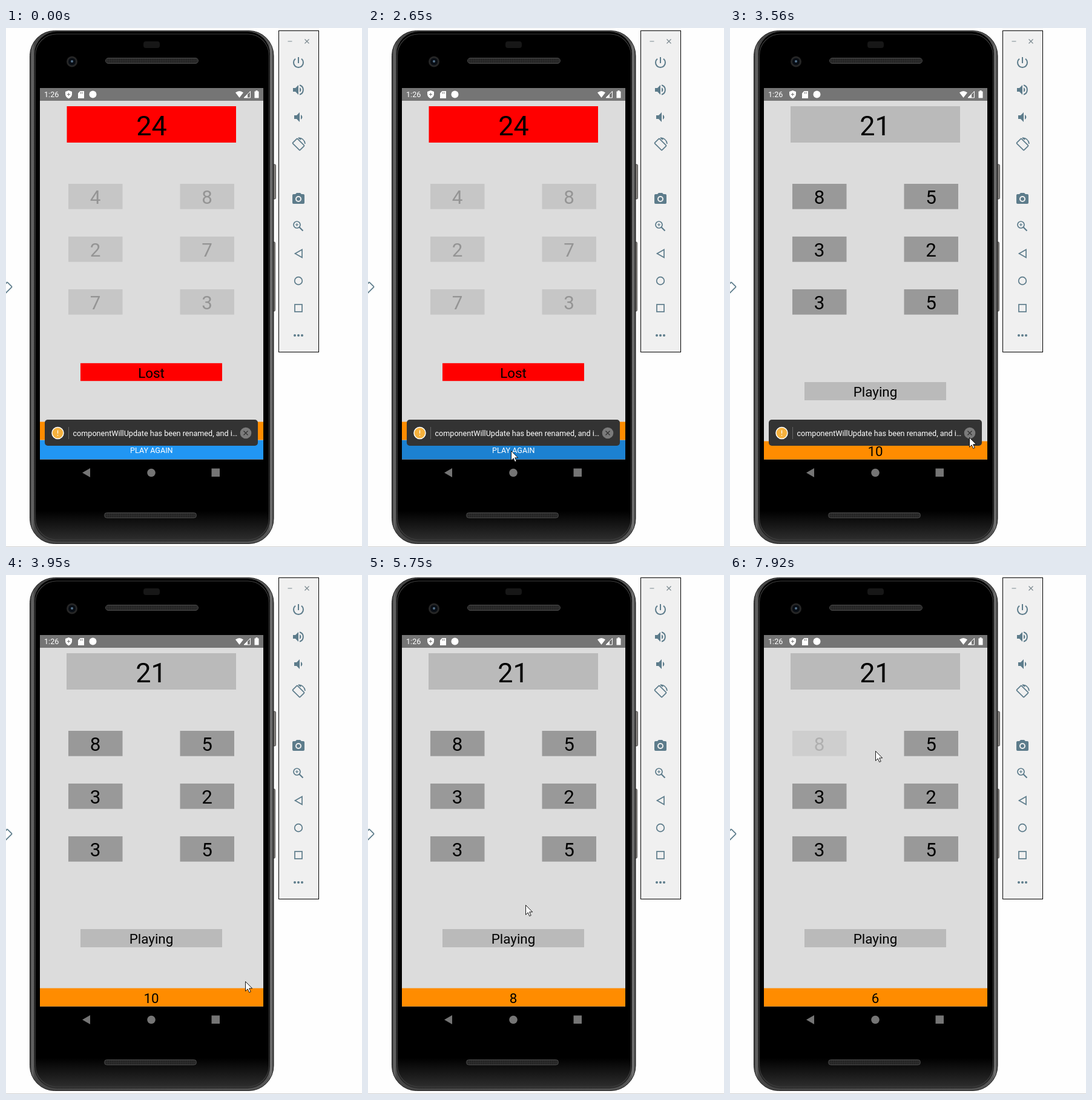
Recreate the animation shown at these times as an HTML page. Size 588x856 px, loop 7.99 s.

```html
<!DOCTYPE html>
<html lang="en">
<head>
<meta charset="utf-8">
<title>Number game on a phone emulator</title>
<style>
  html, body { margin: 0; width: 100%; height: 100%; overflow: hidden; background: #fefefe; }
  svg { display: block; width: 588px; height: 856px; }
  text { font-family: Roboto, sans-serif; }
  .mid { text-anchor: middle; }
  .big { font-size: 44.9px; }
  .digit { font-size: 31.4px; }
  .label { font-size: 22.4px; }
  .small { font-size: 12.6px; fill: #fff; }
  #tools { fill: none; stroke: #5d7c8b; stroke-width: 1.7; }
  #tools .solid { fill: #5d7c8b; stroke: none; }
</style>
</head>
<body>
<svg viewBox="0 0 588 856">
  <defs>
    <linearGradient id="rim">
      <stop offset="0" stop-color="#333"/><stop offset=".01" stop-color="#666"/>
      <stop offset=".02" stop-color="#444"/><stop offset=".98" stop-color="#555"/>
      <stop offset=".99" stop-color="#777"/><stop offset="1" stop-color="#333"/>
    </linearGradient>
    <linearGradient id="glass" x2="0" y2="1">
      <stop offset=".94"/><stop offset="1" stop-color="#303030"/>
    </linearGradient>
    <pattern id="mesh" width="3" height="3" patternUnits="userSpaceOnUse">
      <rect width="3" height="3" fill="#303030"/><circle cx="1.5" cy="1.5" r=".9" fill="#161616"/>
    </pattern>
    <clipPath id="playClip"><rect x="56" y="679.5" width="369" height="32"/></clipPath>
  </defs>
  <path d="M0 855.5H588" stroke="#d0d0d0"/>

  <g id="phone">
    <g fill="#8a8683" stroke="#333" stroke-width=".8">
      <rect x="438" y="225" width="7.5" height="57" rx="1.5"/>
      <rect x="438" y="353" width="6.5" height="114" rx="1.5"/>
    </g>
    <rect x="39.5" y="4.500" width="402.500" height="846" rx="41" fill="url(#rim)" stroke="#1c1c1c"/>
    <rect x="47" y="6" width="389" height="841" rx="37" fill="url(#glass)"/>
    <rect x="48.5" y="10" width="386" height="834" rx="35" fill="none" stroke="#3c3c3c" stroke-width="1.2"/>
    <rect x="227" y="22" width="27" height="11" rx="4" fill="#171717"/>
    <g fill="url(#mesh)" stroke="#464646">
      <rect x="164.5" y="49.500" width="153" height="9" rx="4.500"/>
      <rect x="162.5" y="799.500" width="152" height="8.500" rx="4"/>
    </g>
    <circle cx="109" cy="55.500" r="9" fill="#262626"/>
    <circle cx="109" cy="55.500" r="6" fill="#080d14"/>
    <circle cx="109" cy="55" r="2" fill="#55718a"/>
  </g>

  <rect x="56" y="99" width="369" height="612.5" fill="#dcdcdc"/>
  <g id="status" fill="#fff">
    <rect x="56" y="99" width="369" height="21" fill="#757575"/>
    <text x="63" y="114" class="small">1:26</text>
    <path d="M103.5 103l5.500 2v4q0 5-5.500 7.500-5.500-2.500-5.500-7.500v-4z"/>
    <path d="M122.5 104h6.500v12h-10v-8.500z"/>
    <path d="M103.5 107v5M101 109.500h5M123.500 105.500v3M126 105.500v3" stroke="#757575"/>
    <circle cx="143.500" cy="109.500" r="6"/>
    <path d="M379 106.500q6.500-5 13 0l-6.500 8.500z"/>
    <path d="M403.500 104.500v10.500h-10.500z" fill="none" stroke="#fff"/>
    <path d="M399 109v6h-6z"/>
    <path d="M412.500 103h3v1.500h2v11h-7v-11h2z"/>
  </g>

  <g id="lost">
    <rect x="100.500" y="129" width="279.500" height="60" fill="red"/>
    <text x="240.500" y="177" class="mid big">24</text>
    <g id="lostTiles"></g>
    <rect x="123" y="552.800" width="234" height="29.400" fill="red"/>
    <text x="240" y="576.500" class="mid label">Lost</text>
    <rect x="56" y="649.500" width="369" height="30" fill="#ff8c00"/>
    <g clip-path="url(#playClip)">
      <rect x="56" y="679.500" width="369" height="32" fill="#2196f3"/>
      <circle id="ripple" cx="208" cy="697" opacity=".14"/>
    </g>
    <text x="240.300" y="700.500" class="mid small">PLAY AGAIN</text>
  </g>

  <g id="playing">
    <rect x="100" y="129" width="280" height="60" fill="#bababa"/>
    <text x="239.500" y="177" class="mid big">21</text>
    <g id="playTiles"></g>
    <rect x="123" y="584" width="234" height="30" fill="#bababa"/>
    <text x="240" y="608" class="mid label">Playing</text>
    <rect x="56" y="681.500" width="369" height="30" fill="#ff8c00"/>
    <text id="timer" x="240" y="705.500" class="mid label"></text>
  </g>

  <g id="banner">
    <rect x="64" y="646" width="352" height="43" rx="5" fill="#333"/>
    <circle cx="85.500" cy="668" r="9.500" fill="#f5b13d" stroke="#fff" stroke-width="1.500"/>
    <path d="M85.500 663.500v5.500M85.500 671v1.500" stroke="#fff" stroke-width="1.200"/>
    <path d="M103.500 658v20" stroke="#666"/>
    <text x="110.500" y="672.700" class="small">componentWillUpdate has been renamed, and i…</text>
    <circle cx="396" cy="668" r="9.300" fill="#7b7b7b"/>
    <path d="M392.500 664.500l7 7m0-7l-7 7" stroke="#333" stroke-width="1.400"/>
  </g>

  <g id="nav" fill="#757575">
    <path d="M139 726v15l-13-7.500z"/>
    <circle cx="240" cy="733.500" r="6.800"/>
    <rect x="339.500" y="726.500" width="13.500" height="13.500"/>
  </g>

  <rect x="450.500" y="4.500" width="66" height="530" fill="#f0f0f0" stroke="#000"/>
  <path d="M465.500 22h7M493.500 18.500l7 7m0-7l-7 7" stroke="#7b8990" stroke-width="1.200"/>
  <g id="tools">
    <g stroke-width="2"><path d="M0-9V1M-5-6.200A8 8 0 1 0 5-6.200"/></g>
    <g stroke-width="2">
      <path id="speaker" class="solid" d="M-9-3h4l5-5V8l-5-5h-4z"/>
      <path d="M2-7.700a8 8 0 0 1 0 15.400"/>
      <path id="wave" class="solid" d="M2-4a4.500 4.500 0 0 1 0 8z"/>
    </g>
    <g><use href="#speaker" x="2"/><use href="#wave" x="2"/></g>
    <g id="rotate">
      <rect x="-8.500" y="-5.500" width="17" height="11" rx="1" transform="rotate(45)"/>
      <path d="M0-11Q10-10 11-1M4-8L0-11"/>
    </g>
    <g><use href="#rotate" transform="scale(-1 1)"/></g>
    <g>
      <path class="solid" d="M-3-10H3l2 2h3q2 0 2 2V6q0 2-2 2H-8q-2 0-2-2V-6q0-2 2-2h3z"/>
      <circle r="4" stroke="#f0f0f0" stroke-width="2"/>
    </g>
    <g>
      <circle cx="-2.500" cy="-2.500" r="5.500"/>
      <path d="M1.500 1.500l6 6" stroke-width="2.200"/>
      <path d="M-5-2.500h5M-2.500-5v5" stroke-width="1.200"/>
    </g>
    <g><path d="M6-6.500v13L-5.500 0z"/></g>
    <g><circle r="6.300"/></g>
    <g><rect x="-6" y="-6" width="12" height="12"/></g>
    <g class="solid"><circle cx="-6" r="2"/><circle r="2"/><circle cx="6" r="2"/></g>
  </g>

  <g id="cursor">
    <circle id="click" r="15" fill="#ff0" opacity=".47"/>
    <path d="M.5.500V16.300L4.200 12.800 6.700 18.500 9.200 17.400 6.700 11.800H11.700z" fill="#fff" stroke="#000" stroke-width=".9"/>
  </g>
</svg>
<script>
const LOOP = 7990, STEP = 77, NEW_GAME = 3560, BANNER_GONE = 3950;
const $ = id => document.getElementById(id);
const show = (id, on) => $(id).setAttribute('display', on ? 'inline' : 'none');
const within = (t, a, b) => t >= a && t < b;
const progress = (t, a, b) => Math.min(1, Math.max(0, (t - a) / (b - a)));

[...$('tools').children].forEach((icon, i) =>
  icon.setAttribute('transform', `translate(483 ${57 + 45 * i})`));

const tiles = (digits, opacity) => [...digits].map((d, i) => {
  const x = i % 2 ? 287.5 : 103, y = 257 + 87 * (i >> 1);
  return `<g opacity="${opacity}"><rect x="${x}" y="${y}" width="89.5" height="41.7" fill="#999"/>
    <text class="mid digit" x="${x + 44.7}" y="${y + 33.3}">${d}</text></g>`;
}).join('');
$('lostTiles').innerHTML = tiles('482773', .32);
$('playTiles').innerHTML = tiles('853235', 1);
const pressedTile = $('playTiles').firstElementChild;

// Each move curves from the previous resting place past "via" to "to"
const moves = [
  { at: 700, until: 850, from: [360, 856], to: [360, 831] },
  { at: 1400, until: 1790, from: [276, 570], via: [45, 720], to: [217, 701] },
  { at: 1870, until: 2180, to: [207, 697] },
  { at: 2640, until: 3260, via: [340, 700], to: [395, 675] },
  { at: BANNER_GONE, until: BANNER_GONE, to: [395, 670] },
  { at: 4260, until: 4800, via: [250, 620], to: [158, 580] },
  { at: 4880, until: 5050, to: [262, 509] },
  { at: 5120, until: 5350, via: [70, 555], to: [235, 594] },
  { at: 5530, until: 5750, via: [255, 530], to: [266, 548] },
  { at: 6200, until: 6900, via: [320, 260], to: [157, 264] },
  { at: 7130, until: 7130, to: [154, 274] },
  { at: 7690, until: 7920, to: [240, 290] }
];
moves.forEach((move, i) => {
  move.from ??= moves[i - 1].to;
  move.via ??= move.from.map((v, axis) => (v + move.to[axis]) / 2);
});

function pointerAt(t) {
  const { at, until, from, via, to } = moves.findLast(m => m.at <= t) ?? moves[0];
  const steps = Math.round((until - at) / STEP) + 1;
  const u = Math.min(1, (Math.floor((t - at) / STEP) + 1) / steps);
  return from.map((v, axis) =>
    Math.round(v * (1 - u) ** 2 + 2 * via[axis] * u * (1 - u) + to[axis] * u * u));
}

function draw(t) {
  show('lost', t < NEW_GAME);
  show('playing', t >= NEW_GAME);
  show('banner', t < BANNER_GONE);
  show('cursor', within(t, 700, 1230) || t >= 1400);
  show('click', within(t, 2250, 2400) || within(t, 3790, BANNER_GONE) || within(t, 7360, 7510));
  $('cursor').setAttribute('transform', `translate(${pointerAt(t)})`);
  $('ripple').setAttribute('r', 230 * progress(t, 2250, 2640));
  $('timer').textContent = 10 - Math.max(0, Math.floor((t - 3640) / 1012.5));
  pressedTile.setAttribute('opacity', 1 - .8 * progress(t, 7360, 7510));
}

const begin = performance.now();
function tick() {
  draw((performance.now() - begin) % LOOP);
  requestAnimationFrame(tick);
}
tick();
</script>
</body>
</html>
```
